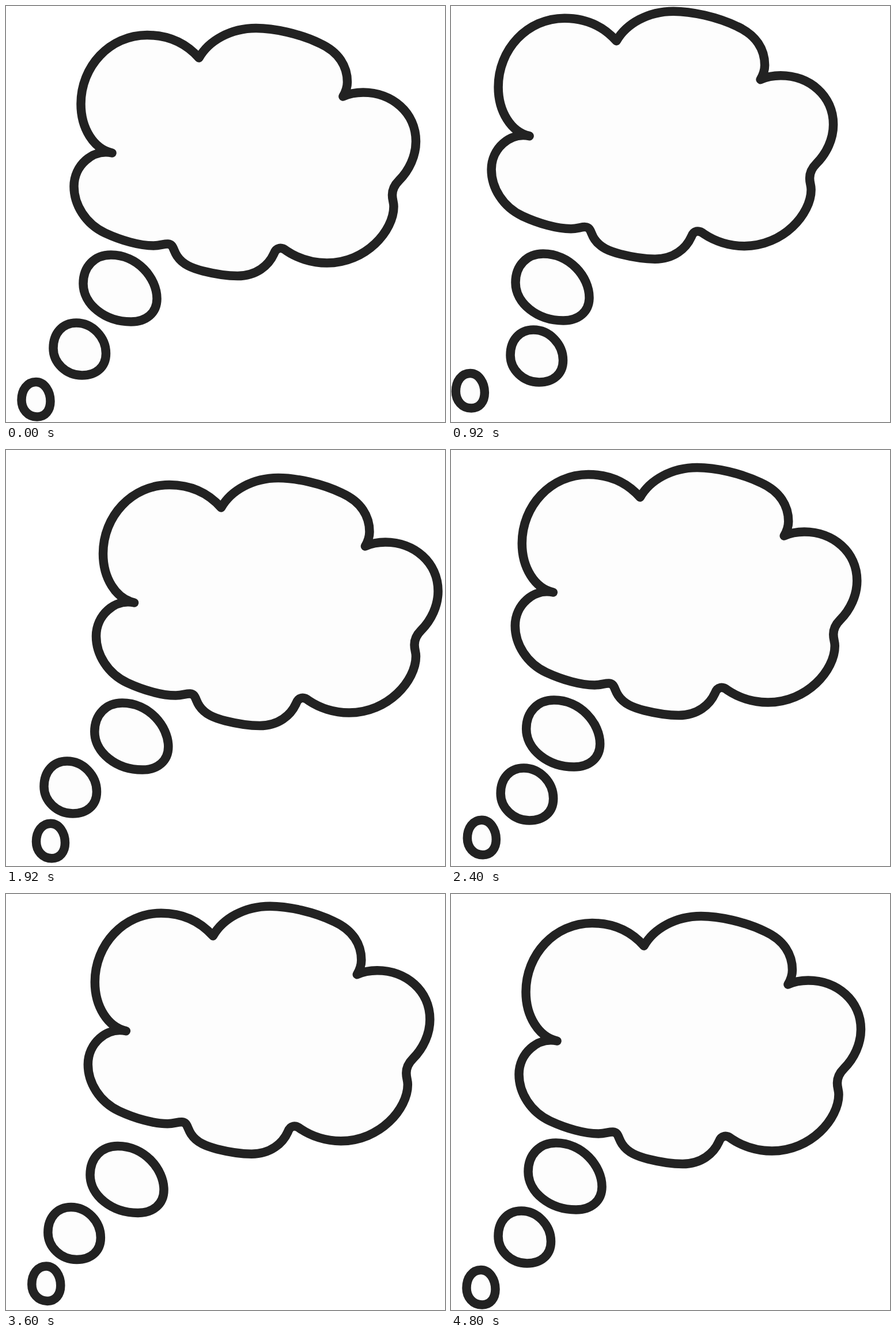
Write an HTML page that moves like this. It is 762 px wide and 722 px high and loops after 5400 ms.

```html
<!DOCTYPE html>
<html lang="en">
<head>
<meta charset="utf-8">
<title>Thought bubble</title>
<style>
  html, body { margin: 0; width: 100%; height: 100%; overflow: hidden; background: #fff; }
  svg { display: block; width: 762px; height: 722px; }
  path { fill: #fdfdfd; stroke: #222; stroke-width: 15.5; stroke-linejoin: round; stroke-linecap: round; }
</style>
</head>
<body>
<svg viewBox="0 0 762 722">
  <path id="small" d="M52 652.5C67 652.5 77 669 77 686C77 702 68 713 54 713C38 713 27 700 27 684C27 666 37 652.5 52 652.5Z"/>
  <path id="middle" d="M122 550C150 550 173.5 575 173.5 603C173.5 627 156 641 132 641C104 641 82 619 82 594C82 568 98 550 122 550Z"/>
  <path id="large" d="M182 432C228 432 262 472 262 508C262 533 243 548 217 548C172 548 134 518 134 482C134 452 154 432 182 432Z"/>
  <path id="cloud" d="M335 90C310 62 278 50.5 245 50.5C180 50.5 130 105 130 170C130 212 152 248 184 255
    C150 248 118 277 118 313C118 345 138 378 172 394C200 407 232 416 256 416C268 416 274 412.5 281 413
    C291 413.5 290 424 297 434C307 449 323 455 342 460C362 465 384 468.5 402 468.5C435 468.5 456 450 465 430
    C469 419 478 417.5 487 425C505 437 530 446 557 446C625 446 673 390 673 348C673 340 670.5 337 670.5 328
    C670.5 318 675 310 682 303C700 285 711.5 260 711.5 235C711.5 185 670 150 620 150C608 150 596 152 585 157
    C592 145 592.5 138 592.5 132C592.5 105 578 80 545 65C510 48 465 38.5 434 38.5C390 38.5 352 60 335 90Z"/>
</svg>
<script>
const LOOP = 5400, TICK = 40, STEPS = 75, SPAN = 15;

// stops: offsets at the turning points; first and last: path bends of the outer legs;
// lead: how far the third leg runs ahead
const tracks = {
  cloud:  { stops: [[0, 0], [-48.4, -30], [38.5, 10], [-62, -30], [42.7, -14.6], [0, 0]],
            first: [-2.9, 6.7], last: [0.6, 6.4], lead: 0 },
  large:  { stops: [[0, 0], [-22.3, -2], [19.8, 7.1], [-22.3, -2], [19.3, 7.1], [0, 0]],
            first: [0, 0], last: [0, 0], lead: 0.4 },
  middle: { stops: [[0, 0], [21.3, 12.2], [-16, -10], [20.7, 11.8], [-15.5, -10.4], [0, 0]],
            first: [0, 0], last: [0, 0], lead: 0.4 },
  small:  { stops: [[0, 0], [-18.8, -15.2], [25.5, -4.3], [-18.5, -15], [25.5, -4.8], [0, 0]],
            first: [-2.7, 2.4], last: [0, 6.7], lead: 0.4 }
};

const shapes = Object.keys(tracks).map(id => [document.getElementById(id), tracks[id]]);

function offset(track, step) {
  const leg = Math.min(Math.floor(step / SPAN), 4);
  const p = step / SPAN - leg;
  let e = p * p * (3 - 2 * p);
  if (leg === 2) e += track.lead * e * (1 - e);
  const early = leg === 4 ? 3 * e * (1 - e) ** 2 : 0;
  const late = leg === 0 ? 3 * e * e * (1 - e) : 0;
  const from = track.stops[leg], to = track.stops[leg + 1];
  return [0, 1].map(i =>
    from[i] + (to[i] - from[i]) * e + track.first[i] * late + track.last[i] * early);
}

function draw(ms) {
  const tick = Math.floor((ms % LOOP) / TICK);
  const step = Math.min(Math.floor(tick * 5 / 8), STEPS);
  for (const [el, track] of shapes) {
    const [x, y] = offset(track, step);
    el.setAttribute("transform", `translate(${x.toFixed(2)} ${y.toFixed(2)})`);
  }
}

const start = performance.now();
function loop(now) {
  draw(Math.max(0, now - start));
  requestAnimationFrame(loop);
}
draw(0);
requestAnimationFrame(loop);
</script>
</body>
</html>
```
